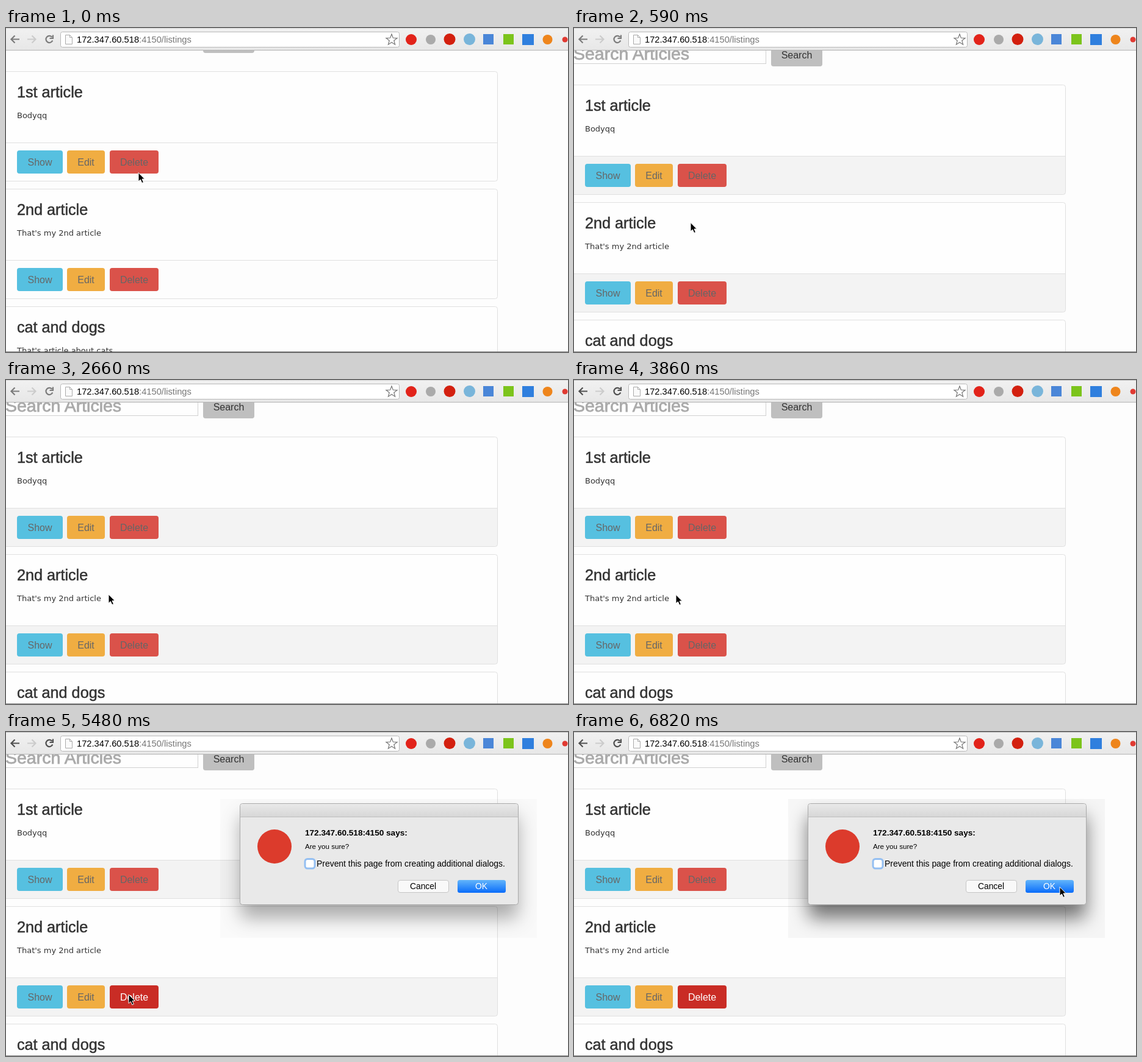
Recreate the animation shown at these times as an HTML page. Size 921 by 532 pixels, loop 8000 ms.

```html
<!DOCTYPE html>
<html lang="en">
<head>
<meta charset="utf-8">
<title>Article list</title>
<style>
  html, body { margin: 0; width: 100%; height: 100%; overflow: hidden; background: #fdfdfd; }
  svg { display: block; }
  text { font-family: "Liberation Sans", Arial, sans-serif; white-space: pre; }
  .body { font: 13px "DejaVu Sans", Verdana, sans-serif; fill: #333; }
  .title { font-size: 25.2px; fill: #333; stroke: #333; stroke-width: .5px; }
  .hint { font-size: 28.5px; fill: #aaa; stroke: #aaa; stroke-width: .8px; }
  .label { font-size: 16px; text-anchor: middle; }
  .small { font-size: 13.8px; text-anchor: middle; }
</style>
</head>
<body>
<svg id="stage" width="921" height="532" viewBox="0 0 921 532"></svg>
<script>
const HOST = "172.347.60.518", PORT = ":4150", LOOP = 8000;
const ARTICLES = [
  ["1st article", "Bodyqq"],
  ["2nd article", "That's my 2nd article"],
  ["cat and dogs", "That's article about cats"]
];

const rect = (x, y, w, h, fill, r = 0, extra = "") =>
  `<rect x="${x}" y="${y}" width="${w}" height="${h}" rx="${r}" fill="${fill}" ${extra}/>`;
const circle = (x, y, r, fill) => `<circle cx="${x}" cy="${y}" r="${r}" fill="${fill}"/>`;
const text = (x, y, str, cls, extra = "") => `<text x="${x}" y="${y}" class="${cls}" ${extra}>${str}</text>`;
const gradient = (id, from, to) => `<linearGradient id="${id}" x2="0" y2="1">
  <stop stop-color="${from}"/><stop offset="1" stop-color="${to}"/></linearGradient>`;

const button = (x, w, str, fill, id = "") => `<g id="${id}" fill="#666">
  ${rect(x, 130, w, 38, fill, 4)}${text(x + w / 2, 155, str, "label")}</g>`;

const card = ([title, body], i) => `<g transform="translate(0 ${71 + i * 193})">
  ${rect(-9.5, .5, 815, 180, "#fefefe", 4)}
  <path class="foot" d="M-9 117.5H805.5V176.5a4 4 0 0 1-4 4H-9Z"/>
  ${rect(-9.5, .5, 815, 180, "none", 4, 'stroke="#e0e0e0"')}
  ${rect(0, 117, 805, 1, "#dfdfdf")}
  ${text(18, 43, title, "title")}${text(18, 77, body, "body")}
  ${button(18, 75, "Show", "#56c0e0")}
  ${button(100, 62, "Edit", "#f0ad42")}
  ${button(170, 80, "Delete", "#da524a", "del" + i)}</g>`;

const star = Array.from({ length: 10 }, (_, i) => {
  const a = i * Math.PI / 5 - Math.PI / 2, r = i % 2 ? 4 : 9.5;
  return `${632 + r * Math.cos(a)},${19.5 + r * Math.sin(a)}`;
}).join(" ");

const page = `<g id="page">
  ${rect(-9.5, -20, 324, 56.5, "#fefefe", 0, 'stroke="#d0d0d0"')}
  ${text(-1, 30, "Search Articles", "hint")}
  ${rect(323, 3, 84, 38, "#bfbfbf", 4)}${text(365, 28, "Search", "label", 'fill="#333"')}
  ${ARTICLES.map(card).join("")}</g>`;

const toolbar = `<g>
  ${rect(0, 0, 921, 37, "url(#bar)")}${rect(0, 0, 921, 1, "#cfcfcf", 0, 'id="strip"')}
  ${rect(0, 36, 921, 1, "#b4b4b4")}
  <g id="nav" fill="none" stroke-width="2.2">
    <path d="M22 18.5H9M14.5 12.5L8.5 18.5L14.5 24.5"/>
    <path d="M35 18.5H48M42.5 12.5L48.5 18.5L42.5 24.5" stroke="#ccc"/>
    <path d="M75.5 15A5.6 5.6 0 1 0 76.3 20.5M77 11.5V17H71.5"/>
  </g>
  ${rect(89.5, 6.5, 555, 25, "#fff", 3, 'stroke="#b8b8b8"')}
  <path d="M97.5 11.5H104.5L108.5 15.5V26.5H97.5ZM104.5 11.5V15.5H108.5" fill="#fafafa" stroke="#aaa"/>
  ${text(116, 24, `${HOST}<tspan fill="#777">${PORT}/listings</tspan>`, "", 'font-size="14.7"')}
  <polygon points="${star}" fill="#fff" stroke="#777" stroke-width="1.2"/>
  ${circle(664, 19, 9, "#e2231a")}${circle(696, 19, 8, "#aaa")}
  ${circle(727, 18.5, 9.5, "#d3200f")}${circle(759.5, 18.5, 9.5, "#79b5da")}
  ${rect(782, 10, 17, 17, "#4a86d8")}${rect(815, 10, 17, 17, "#7cc41c")}
  ${rect(846, 10, 19, 18, "#2f7fde")}${circle(887.5, 19, 8, "#ee851c")}
  ${circle(916, 19, 4.5, "#e03a32")}</g>`;

const dialog = `<g id="dialog">
  <g id="shadow" clip-path="url(#halo)">
    ${rect(351, 110, 519, 228, "#000", 0, 'opacity=".03"')}
    ${rect(384, 138, 455, 168, "#000", 8, 'opacity=".52" filter="url(#blur)"')}
  </g>
  ${rect(383.5, 117.5, 456, 166, "#e9e9e9", 4, 'stroke="#aaa"')}
  ${rect(384, 118, 455, 22, "url(#caption)", 4)}${rect(384, 139, 455, 1, "#bdbdbd")}
  ${circle(440, 188, 28, "#dc3b2c")}
  ${text(490, 170, `${HOST}${PORT} says:`, "", 'font-size="13.6" font-weight="700"')}
  ${text(490, 192, "Are you sure?", "", 'font-size="11.6"')}
  ${rect(490, 208.5, 16, 15.5, "#fff", 4, 'stroke="#94bff2" stroke-width="3"')}
  ${text(509, 221, "Prevent this page from creating additional dialogs.", "", 'font-size="13.93"')}
  ${rect(642.5, 243.5, 83, 20, "#f9f9f9", 3.5, 'stroke="#c6c6c6"')}${text(683.5, 258, "Cancel", "small")}
  ${rect(740, 243, 79, 21, "url(#ok)", 3.5)}${text(779, 258, "OK", "small", 'fill="#fff"')}</g>`;

const pointers = `<g id="pointer" stroke-linejoin="round">
  <path id="arrow" d="M0 0V14.5L3.4 11.5L5.8 17L8.4 15.9L6 10.5H10.4Z" fill="#000" stroke="#fff"/>
  <path id="hand" d="M-1.2 9V1Q0 -1 1.3 1V6Q2.7 4.8 4 6.3Q5.4 5.3 6.5 7Q8.3 6.3 8.8 8.5V11.5
    L7 17H0L-4.3 10.5Q-4.5 8.5 -2.7 8.8L-1.2 10.5ZM1.3 6V9M4 6.5V9.3M6.5 7V9.6" fill="#fff" stroke="#000"/></g>`;

stage.innerHTML = `<defs>
  ${gradient("bar", "#f1f1f1", "#e7e7e7")}${gradient("caption", "#e9e9e9", "#d6d6d6")}${gradient("ok", "#62b5fb", "#0a6cfa")}
  <filter id="blur" x="-20%" y="-50%" width="140%" height="200%"><feGaussianBlur stdDeviation="15"/></filter>
  <clipPath id="halo">${rect(351, 110, 519, 228, "#000")}</clipPath></defs>
  ${rect(0, 0, 921, 532, "#fdfdfd")}${page}${toolbar}${rect(0, 531, 921, 1, "#858585")}${dialog}${pointers}`;

// Pointer moves: first step, last step, number of steps, end point
const MOVES = [
  [440, 740, 3, 182, 347],
  [1640, 1640, 1, 141, 510],
  [1790, 2660, 7, 168, 352],
  [2810, 2810, 1, 167, 352.5],
  [4010, 4880, 7, 201, 432],
  [5480, 5480, 1, 201, 431],
  [6080, 6820, 6, 796, 254.5]
];
const SCROLLS = [[150, 12], [300, 20], [440, 21], [590, 22]];

const $ = id => document.getElementById(id);
const show = (id, on) => $(id).setAttribute("display", on ? "inline" : "none");
const ease = p => (1 - Math.cos(Math.PI * p)) / 2;

function pointerAt(t) {
  let x = 217, y = 237.5;
  for (const [start, end, steps, toX, toY] of MOVES) {
    if (t < start) break;
    const gap = (end - start) / (steps - 1) || 1;
    const step = Math.min(steps, Math.floor((t - start) / gap + .03) + 1);
    const p = ease(step / steps);
    x += (toX - x) * p;
    y += (toY - y) * p;
  }
  return [Math.round(x), Math.round(y * 2) / 2];
}

function draw(t) {
  const [x, y] = pointerAt(t);
  const scroll = SCROLLS.reduce((s, [at, v]) => t >= at ? v : s, 0);
  const active = t >= 3860, asked = t >= 5480;
  const hover = asked || (t >= 4010 && y >= 416);

  $("page").setAttribute("transform", `translate(0 ${scroll})`);
  document.querySelectorAll(".foot").forEach(f => f.setAttribute("fill", t < 150 ? "#fdfdfd" : "#f3f3f3"));
  $("nav").setAttribute("stroke", active ? "#505050" : "#7c7c7c");
  $("strip").setAttribute("fill", active ? "#bdbdbd" : "#d4d4d4");

  $("del1").setAttribute("fill", hover ? "#fff" : "#666");
  $("del1").firstElementChild.setAttribute("fill", hover ? "#c92c25" : "#da524a");

  show("dialog", asked);
  $("shadow").setAttribute("opacity", t < 5630 ? .6 : 1);
  show("hand", hover && !asked);
  show("arrow", !hover || asked);
  $("pointer").setAttribute("transform", `translate(${x} ${y})`);
}

const began = performance.now();
function tick() {
  draw((performance.now() - began) % LOOP);
  requestAnimationFrame(tick);
}
tick();
</script>
</body>
</html>
```
